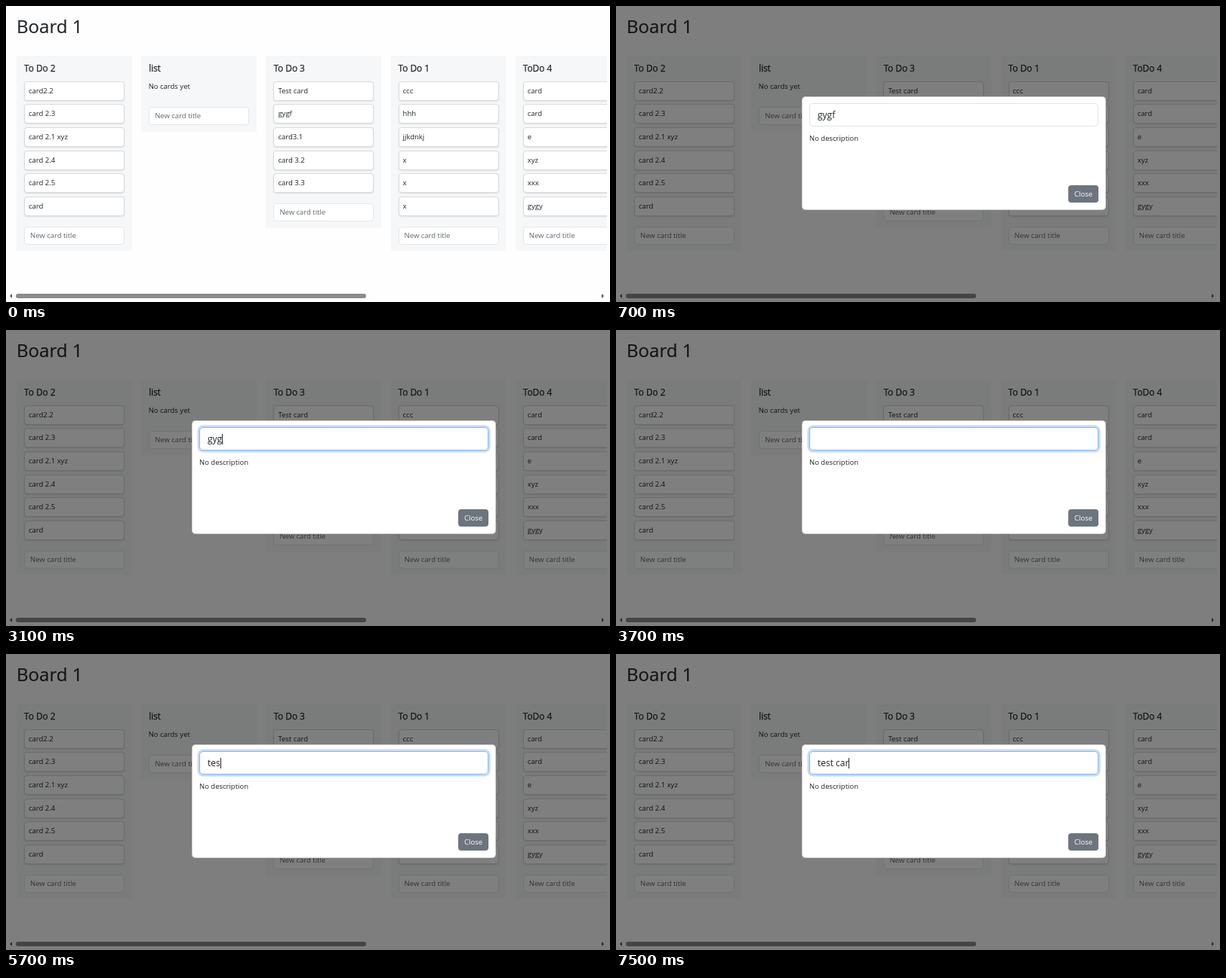
An HTML page that plays this animation: 800x393 px, repeating every 8000 ms.

```html
<!DOCTYPE html>
<html lang="en">
<head>
<meta charset="utf-8">
<title>Board</title>
<style>
  html, body { margin: 0; width: 100%; height: 100%; overflow: hidden; }
  body { position: relative; background: #fefefe; color: #212529; font: 9.5px "Open Sans", sans-serif; }
  div { position: absolute; box-sizing: border-box; }
  #board { left: 0; top: 0; width: 796px; height: 370px; overflow: hidden; }
  .h1 { font-size: 24px; font-weight: 500; -webkit-text-stroke: .2px; }
  .h2 { font-size: 11.8px; font-weight: 500; -webkit-text-stroke: .25px; }
  .list { background: #f6f7f8; }
  .card, .field { background: #fff; border: 1px solid #d8dadc; border-radius: 4px; padding-left: 5px; }
  .card { box-shadow: 0 1px 2px rgba(0, 0, 0, .1); }
  .field { border-color: #e3e6e9; padding-left: 7px; color: #64686c; }
  .thumb { background: #8b8b8b; border-radius: 3px; }
  .arrow { background: #555; }
  #shade { inset: 0; background: rgba(0, 0, 0, .5); }
  #modal { left: 246px; width: 403px; background: #fff; border: 1px solid rgba(0, 0, 0, .2); border-radius: 5px; }
  #content { inset: 0; }
  #close { right: 9px; bottom: 9px; width: 40px; height: 23px; line-height: 23px; text-align: center;
           background: #6c757d; color: #fff; border-radius: 4px; }
  #title { left: 9px; top: 8px; width: 383px; height: 31px; line-height: 29px; padding-left: 10px; white-space: pre;
           border: 1px solid #dee2e6; border-radius: 5px; font-size: 12px; }
  #title.focus { border-color: #86b7fe; box-shadow: 0 0 0 2.5px rgba(13, 110, 253, .25); }
  #caret { display: inline-block; width: 1px; height: 14px; vertical-align: middle; margin-top: -2px; background: #212529; }
  #note { left: 9px; top: 47px; line-height: 16px; }
</style>
</head>
<body>
<div id="board"></div>
<div class="thumb" style="left:13px;top:382px;width:464px;height:6px"></div>
<div class="arrow" style="left:5px;top:382px;width:3px;height:6px;clip-path:polygon(100% 0,100% 100%,0 50%)"></div>
<div class="arrow" style="left:789px;top:382px;width:3px;height:6px;clip-path:polygon(0 0,0 100%,100% 50%)"></div>
<div id="shade">
  <div id="modal">
    <div id="content">
      <div id="title"><span id="text"></span><i id="caret"></i></div>
      <div id="note">No description</div>
    </div>
    <div id="close">Close</div>
  </div>
</div>
<script>
const $ = id => document.getElementById(id);

function box(x, y, w, h, type, text = '') {
  const el = document.createElement('div');
  el.className = type;
  el.textContent = text;
  el.style.cssText = `left:${x}px;top:${y}px;width:${w}px;height:${h}px;line-height:${h - (/card|field/.test(type) ? 2 : 0)}px`;
  $('board').append(el);
}

const lists = [
  ['To Do 2', 'card2.2', 'card 2.3', 'card 2.1 xyz', 'card 2.4', 'card 2.5', 'card'],
  ['list'],
  ['To Do 3', 'Test card', 'gygf', 'card3.1', 'card 3.2', 'card 3.3'],
  ['To Do 1', 'ccc', 'hhh', 'jjkdnkj', 'x', 'x', 'x'],
  ['ToDo 4', 'card', 'card', 'e', 'xyz', 'xxx', 'gygy']
];

box(14, 10, 200, 34, 'h1', 'Board 1');
lists.forEach(([name, ...cards], i) => {
  const x = 14 + i * 165.2;
  const fieldY = cards.length ? 109 + cards.length * 30.65 : 134;
  box(x, 66, 152.5, fieldY - 33.5, 'list');
  box(x + 10, 73, 130, 18, 'h2', name);
  if (!cards.length) box(x + 9.5, 99, 130, 16, '', 'No cards yet');
  cards.forEach((card, n) => box(x + 10, 99.6 + n * 30.65, 133, 26, 'card', card));
  box(x + 10, fieldY, 133, 24, 'field', 'New card title');
});

// Start time and field text; a trailing bar is a visible caret.
const typing = [
  [700, 'gygf'], [1900, 'gygf|'], [2500, 'gygf'], [3100, 'gyg|'], [3300, 'gy|'], [3500, 'g|'],
  [3700, ''], [4300, '|'], [4900, ''], [5100, 't|'], [5300, 'te|'], [5700, 'tes|'], [5900, 'test|'],
  [6300, 'test |'], [6900, 'test '], [7100, 'test c|'], [7300, 'test ca|'], [7500, 'test car|']
];

function draw(now) {
  const t = now % 8000;
  const step = typing.findLast(([start]) => start <= t);
  const value = step ? step[1] : '';
  $('shade').style.display = t < 500 ? 'none' : '';
  $('content').style.display = step ? '' : 'none';
  $('modal').style.top = (step ? 120 : 132) + 'px';
  $('modal').style.height = (step ? 151 : 127) + 'px';
  $('title').className = t >= 2100 ? 'focus' : '';
  $('text').textContent = value.replace('|', '');
  $('caret').style.visibility = value.endsWith('|') ? '' : 'hidden';
  requestAnimationFrame(draw);
}
requestAnimationFrame(draw);
</script>
</body>
</html>
```
